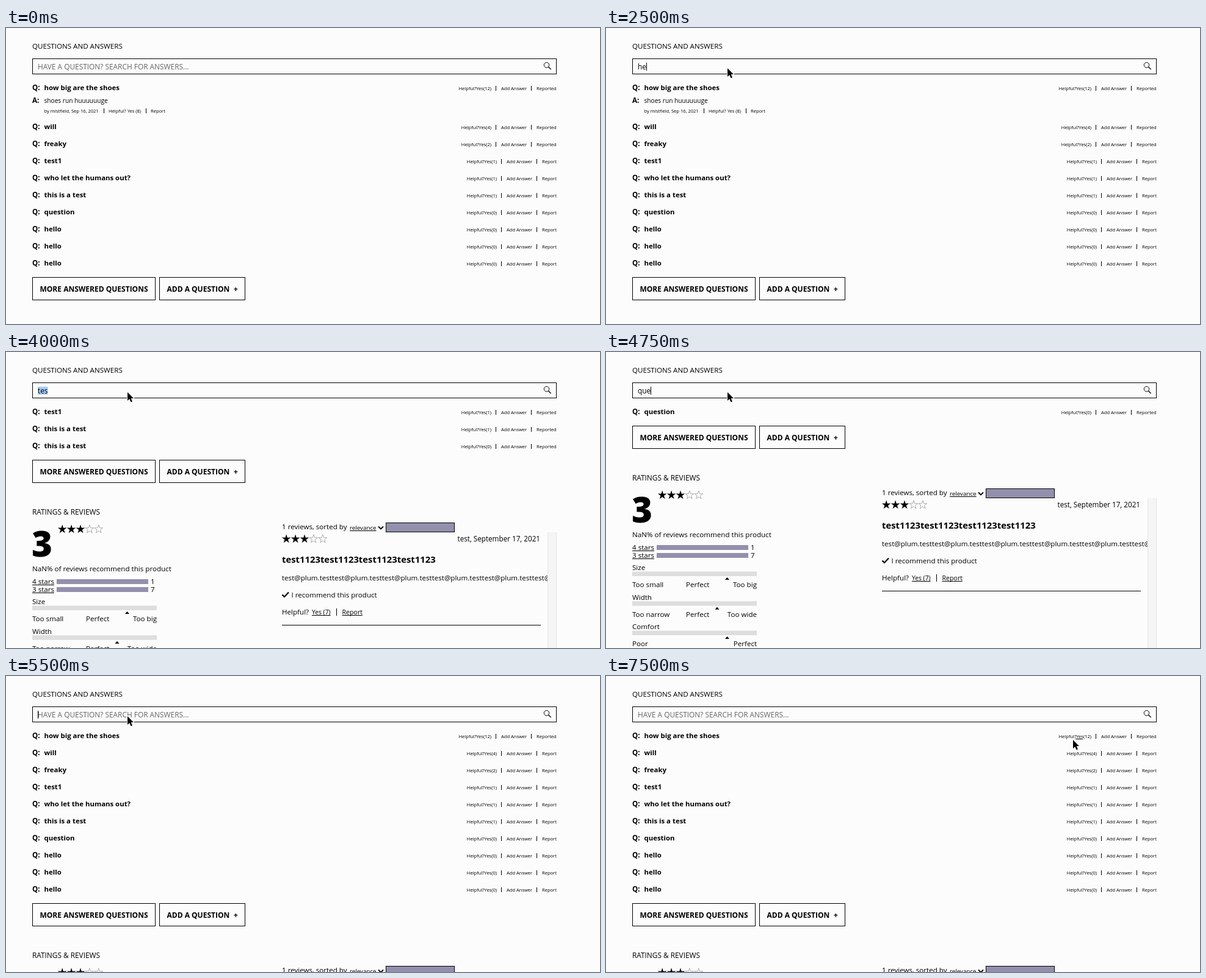
An HTML page with a canvas for the animation above (8 s loop, 973 by 486 pixels).

```html
<!DOCTYPE html>
<html lang="en">
<head>
<meta charset="utf-8">
<style>
  html, body { margin: 0; width: 100%; height: 100%; overflow: hidden; background: #fcfcfc; }
  canvas { display: block; }
</style>
</head>
<body>
<canvas id="stage" width="973" height="486"></canvas>
<script>
const ctx = document.getElementById('stage').getContext('2d');
const LOOP = 8000, BLACK = '#000', PURPLE = '#9390ad';
const REGULAR = 400, BOLD = 700;

const questions = [
  ['how big are the shoes', 12], ['will', 4], ['freaky', 2], ['test1', 1],
  ['who let the humans out?', 1], ['this is a test', 1], ['question', 0],
  ...Array(3).fill(['hello', 0]), ['this is a test', 0], ...Array(14).fill(['hello', 0])
];

// time, search text, mark (caret "|" or selection "#"), pointer x, pointer y
const steps = [
  [0, '', ''],
  [500, '', '', 263, 76],
  [750, '', '', 224, 70],
  [1000, '', '|', 200, 67],
  [1250, '', '|', 198, 66],
  [1500, '', '', 198, 66],
  [2000, '', '|', 198, 66],
  [2500, 'he', '|', 198, 66],
  [2750, 'hell', '|', 198, 66],
  [3000, 'hello', '|', 198, 66],
  [3250, 'hello', '#', 198, 66],
  [3500, 'tes', '|', 198, 66],
  [3750, 'test', '|', 198, 66],
  [4000, 'tes', '#', 198, 66],
  [4750, 'que', '|', 198, 66],
  [5000, 'quest', '|', 198, 66],
  [5250, 'quest', '#', 198, 66],
  [5500, '', '|', 198, 66],
  [5750, '', '', 198, 66],
  [6000, '', '|', 206, 72],
  [6250, '', '', 300, 178],
  [6500, '', '', 470, 150],
  [6750, '', '', 640, 120],
  [7000, '', '', 757, 108],
  [7250, '', '', 764, 105]
];

function rect(x, y, w, h, color = BLACK) {
  ctx.fillStyle = color;
  ctx.fillRect(x, y, w, h);
}

function frame(x, y, w, h) {
  ctx.strokeStyle = BLACK;
  ctx.lineWidth = 1;
  ctx.strokeRect(x + .5, y + .5, w - 1, h - 1);
}

function line(points, width) {
  ctx.beginPath();
  points.forEach(([x, y]) => ctx.lineTo(x, y));
  ctx.strokeStyle = BLACK;
  ctx.lineWidth = width;
  ctx.stroke();
}

function polygon(points, fill, stroke, width = 1) {
  ctx.beginPath();
  points.forEach(([x, y]) => ctx.lineTo(x, y));
  ctx.closePath();
  if (stroke) {
    ctx.strokeStyle = stroke;
    ctx.lineWidth = width;
    ctx.stroke();
  }
  if (fill) {
    ctx.fillStyle = fill;
    ctx.fill();
  }
}

function text(str, x, y, size = 11.6, weight = REGULAR, align = 'left', color = BLACK) {
  ctx.font = `${weight} ${size}px "Open Sans", "Noto Sans", sans-serif`;
  ctx.textAlign = align;
  ctx.fillStyle = color;
  ctx.fillText(str, x, y);
  return ctx.measureText(str).width;
}

const small = (str, x, y, align) => text(str, x, y, 7.55, REGULAR, align);

function link(str, x, y, size) {
  rect(x, Math.round(y) + 1, text(str, x, y, size), 1);
}

function stars(left, y) {
  for (let i = 0; i < 5; i++) {
    const points = Array.from({ length: 10 }, (_, k) => {
      const r = k % 2 ? 2.9 : i < 3 ? 7.7 : 7.2, a = k * Math.PI / 5;
      return [left + 7.2 + i * 14.9 + r * Math.sin(a), y - r * Math.cos(a)];
    });
    i < 3 ? polygon(points, BLACK) : polygon(points, null, '#999', .8);
  }
}

function searchBar(query, mark) {
  text('QUESTIONS AND ANSWERS', 43, 34, 11.6);
  frame(43, 50, 859, 26);
  ctx.font = '400 11.8px "Open Sans", "Noto Sans", sans-serif';
  const width = ctx.measureText(query).width;
  if (mark === '#') rect(52, 57, width, 13, '#a6cdf7');
  if (query) text(query, 52, 68, 11.8);
  else text('HAVE A QUESTION? SEARCH FOR ANSWERS...', 52, 68, 11.88, REGULAR, 'left', '#666');
  if (mark === '|') rect(Math.round(52 + width), 57, 1, 13);
  ctx.beginPath();
  ctx.arc(885.5, 60.8, 4.2, 0, 7);
  ctx.strokeStyle = BLACK;
  ctx.lineWidth = 1;
  ctx.stroke();
  line([[888.5, 63.8], [892.7, 68]], 1.3);
}

function questionRow([title, votes], y, reported, hovered) {
  text('Q:', 43, y, 11.6, BOLD);
  text(title, 62.5, y, 11.4, BOLD);
  const x = reported ? 869 : 878;
  small(reported ? 'Reported' : 'Report', x, y);
  small('Add Answer', x - 58, y);
  small(`Helpful?Yes(${votes})`, x - 74, y, 'right');
  rect(x - 9, y - 7, 1, 8);
  rect(x - 67, y - 7, 1, 8);
  if (hovered) rect(769, y + 1, 12, 1);
}

function answer() {
  text('A:', 43, 123, 11.6, BOLD);
  text('shoes run huuuuuuge', 62.5, 123, 10.15);
  small('by mistfield, Sep 16, 2021', 62.5, 139);
  small('Helpful? Yes (8)', 168, 139);
  small('Report', 237, 139);
  rect(160, 132, 1, 8);
  rect(229, 132, 1, 8);
}

function buttons(y) {
  frame(43, y, 202, 38);
  text('MORE ANSWERED QUESTIONS', 55.5, y + 24, 12, BOLD);
  frame(251, y, 141, 38);
  text('ADD A QUESTION', 263.5, y + 24, 12, BOLD);
  text('+', 373, y + 24, 12, BOLD);
}

function slider(name, y, markX, low, middle, high) {
  text(name, 43, y);
  rect(43, y + 2.5, 204, 7.5, '#dedede');
  polygon([[markX - 3.5, y + 16], [markX, y + 12], [markX + 3.5, y + 16]], BLACK);
  text(low, 43, y + 28);
  text(middle, 131, y + 28);
  text(high, 247, y + 28, 11.6, REGULAR, 'right');
}

function summary() {
  text('RATINGS & REVIEWS', 43, 90, 11.85);
  stars(85, 114);
  text('3', 42, 159, 58, 800);
  text('NaN% of reviews recommend this product', 43, 183);
  [['4 stars', 1], ['3 stars', 7]].forEach(([label, count], i) => {
    const y = 204 + i * 13;
    link(label, 43, y);
    rect(83, y - 8, 150, 8, PURPLE);
    text(count, 237, y);
  });
  slider('Size', 237, 198.5, 'Too small', 'Perfect', 'Too big');
  slider('Width', 285.7, 182, 'Too narrow', 'Perfect', 'Too wide');
  slider('Comfort', 334, 198.5, 'Poor', '', 'Perfect');
}

function review() {
  text('1 reviews, sorted by', 452, 114);
  link('relevance', 563, 115, 9.8);
  line([[610, 109.5], [614, 113.5], [618, 109.5]], 1.8);
  rect(622, 103, 113, 16, PURPLE);
  frame(622, 103, 113, 16);
  stars(452, 130);
  text('test, September 17, 2021', 875, 134, 11.7, REGULAR, 'right');
  text('test1123'.repeat(4), 452, 169, 14.85, BOLD);
  ctx.save();
  ctx.beginPath();
  ctx.rect(452, 180, 435, 30);
  ctx.clip();
  text('test@plum.test'.repeat(6), 452, 198);
  ctx.restore();
  line([[452.5, 221.5], [456, 225], [463, 217.5]], 2.2);
  text('I recommend this product', 467.5, 226);
  text('Helpful?', 452, 254);
  link('Yes (7)', 501, 253.5, 10.3);
  rect(541, 244, 1, 12);
  link('Report', 550.5, 253.5, 10.6);
  rect(452, 271, 424, 1);
  rect(887, 119, 15, 400, '#f5f5f5');
  rect(887, 119, 1, 400, '#e6e6e6');
  rect(901, 119, 1, 400, '#e6e6e6');
}

function pointer(x, y) {
  const shape = [[0, 0], [0, 14], [3.2, 11], [5.6, 16.3], [8, 15.2], [5.7, 10.2], [10, 10]];
  polygon(shape.map(([dx, dy]) => [x + 1 + dx, y + dy]), BLACK, '#fff', 2);
}

function draw(time) {
  const [, query, mark, px, py] = steps.findLast(step => step[0] <= time);
  const filtering = query.length > 2;
  const hasAnswer = !filtering && time < 5500;
  const reportedCount = filtering || hasAnswer ? 3 : 1;
  const list = filtering ? questions.filter(q => q[0].includes(query)) : questions.slice(0, 10);
  const shift = hasAnswer ? 36 : 0;

  rect(0, 0, 973, 486, '#fcfcfc');
  searchBar(query, mark);
  list.forEach((q, i) =>
    questionRow(q, 102 + i * 28 + (i && shift), i < reportedCount, !i && time >= 7250));
  if (hasAnswer) answer();

  const bottom = 93 + list.length * 28 + shift;
  buttons(bottom);
  ctx.save();
  ctx.translate(0, bottom);
  summary();
  review();
  ctx.restore();
  if (px) pointer(px, py);
}

function tick() {
  draw(performance.now() % LOOP);
  requestAnimationFrame(tick);
}
tick();
</script>
</body>
</html>
```
